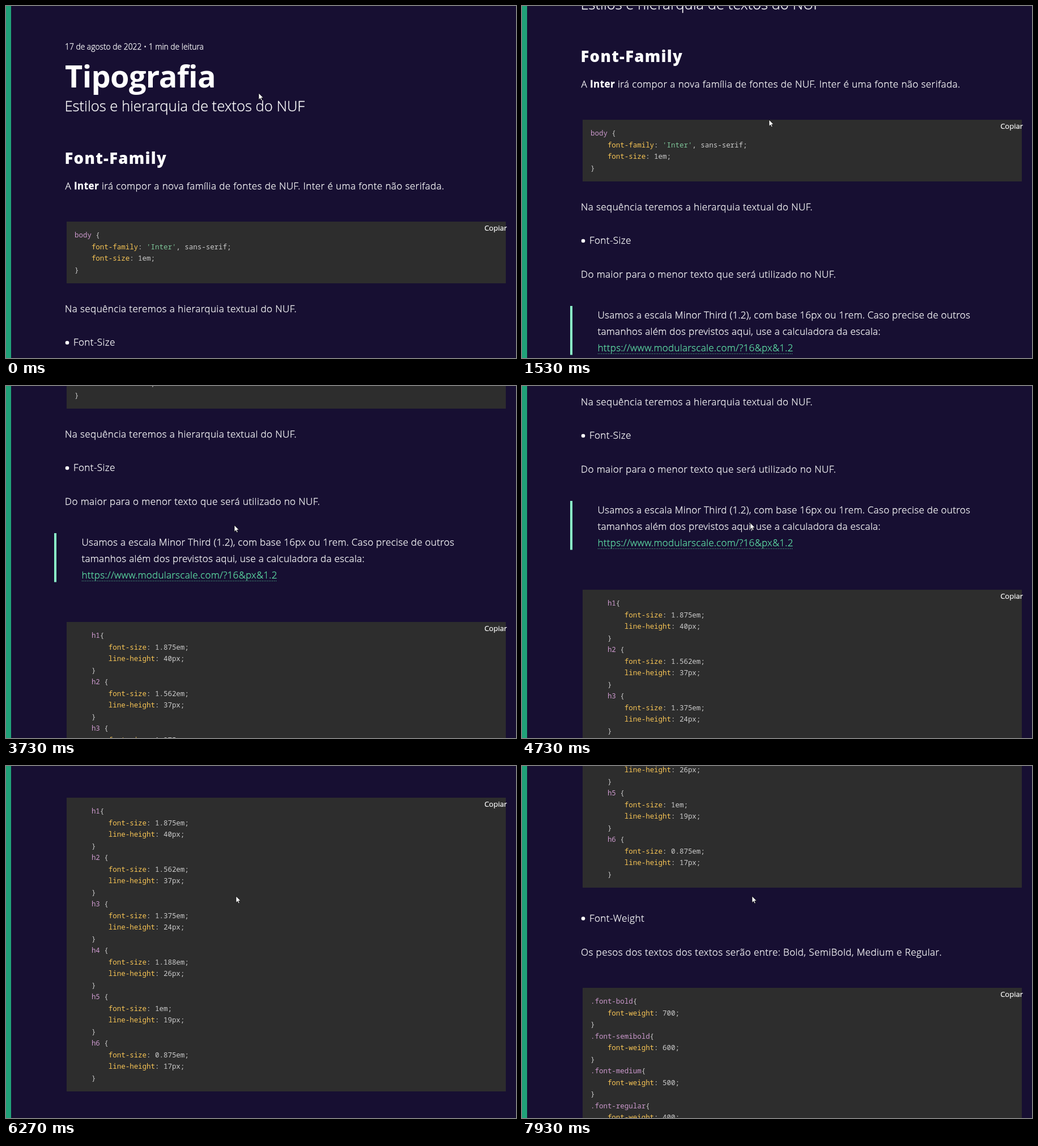
An HTML page for the animation above (8000 ms loop, 900 by 622 pixels).

```html
<!DOCTYPE html>
<html lang="pt">
<head>
<meta charset="utf-8">
<title>Tipografia</title>
<style>
  html, body { margin: 0; width: 100%; height: 100%; overflow: hidden; background: #170f32; }
  svg { display: block; width: 900px; height: 622px; }
  text { font-family: "Open Sans", "Noto Sans", sans-serif; fill: #fff; white-space: pre; }
  .date, .sub, .body, .quote { font-weight: 300; stroke: #fff; stroke-width: .3px; }
  .date { font-size: 13.85px; }
  .title { font-size: 54px; font-weight: 700; letter-spacing: -.6px; }
  .sub { font-size: 25.6px; }
  .head { font-size: 27.5px; font-weight: 800; letter-spacing: 1.3px; }
  .body { font-size: 17px; letter-spacing: .43px; }
  .quote { font-size: 17px; letter-spacing: .3px; }
  .body tspan { font-weight: 700; }
  .copy { font-size: 13px; text-anchor: end; stroke: #fff; stroke-width: .2px; }
  .code { font: 500 12.46px "Noto Sans Mono", "DejaVu Sans Mono", monospace; fill: #ccc; }
  .sel { fill: #cc99cd; }
  .prop { fill: #f8c555; }
  .str { fill: #7ec699; }
  #link text { fill: #5ee0a6; stroke: #5ee0a6; }
  #link path { stroke: #5ee0a6; stroke-dasharray: 1 2; }
</style>
</head>
<body>
<svg viewBox="0 0 900 622">
  <g id="page"></g>
  <rect width="9" height="622" fill="#21a179"/>
  <path id="cursor"/>
</svg>
<script>
const page = document.getElementById('page');
const cursor = document.getElementById('cursor');

const text = (x, y, cls, s) => `<text x="${x}" y="${y}" class="${cls}">${s}</text>`;
const bullet = (y, s) => `<circle cx="108" cy="${y - 5}" r="3.3" fill="#fff"/>` + text(119, y, 'body', s);

// Code block: leading spaces become an x offset, tokens get colours
const CHAR = 7.476, LINE = 20.5;
function paint(line) {
  if (line.endsWith('{')) return line.replace(/^[^ {]+/, '<tspan class="sel">$&</tspan>');
  return line.replace(/'\w+'/, '<tspan class="str">$&</tspan>')
             .replace(/^[\w-]+(?=:)/, '<tspan class="prop">$&</tspan>');
}
function block(top, lines) {
  const rows = lines.map((line, i) => {
    const code = line.trimStart();
    const x = 121 + (line.length - code.length) * CHAR;
    return text(x, top + 28.3 + i * LINE, 'code', paint(code));
  });
  return `<rect x="107" y="${top}" width="775" height="${lines.length * LINE + 27}" fill="#2d2d2d"/>`
    + text(884, top + 16, 'copy', 'Copiar') + rows.join('');
}

const headings = [['1.875', 40], ['1.562', 37], ['1.375', 24], ['1.188', 26], ['1', 19], ['0.875', 17]]
  .flatMap(([size, height], i) => [
    `    h${i + 1}${i ? ' ' : ''}{`,
    `        font-size: ${size}em;`,
    `        line-height: ${height}px;`,
    '    }'
  ]);
const weights = ['bold', 'semibold', 'medium', 'regular']
  .flatMap((name, i) => [`.font-${name}{`, `    font-weight: ${700 - i * 100};`, '}']);

page.innerHTML =
  text(104, 77, 'date', '17 de agosto de 2022 • 1 min de leitura') +
  text(104, 144, 'title', 'Tipografia') +
  text(103.5, 186, 'sub', 'Estilos e hierarquia de textos do NUF') +
  text(103.5, 279, 'head', 'Font-Family') +
  text(104.5, 324, 'body', 'A <tspan>Inter</tspan> irá compor a nova família de fontes de NUF. Inter é uma fonte não serifada.') +
  block(381, ['body {', "    font-family: 'Inter', sans-serif;", '    font-size: 1em;', '}']) +
  text(104, 541, 'body', 'Na sequência teremos a hierarquia textual do NUF.') +
  bullet(600, 'Font-Size') +
  text(104, 660, 'body', 'Do maior para o menor texto que será utilizado no NUF.') +
  '<rect x="85" y="710" width="4" height="86.5" fill="#8af8c8"/>' +
  text(133.5, 732, 'quote', 'Usamos a escala Minor Third (1.2), com base 16px ou 1rem. Caso precise de outros') +
  text(133.5, 761, 'quote', 'tamanhos além dos previstos aqui, use a calculadora da escala:') +
  '<g id="link">' + text(133.5, 790, 'quote', 'https://www.modularscale.com/?16&amp;px&amp;1.2') +
  '<path d="M134 794.5H477"/></g>' +
  block(867, headings) +
  bullet(1445.5, 'Font-Weight') +
  text(104, 1505.5, 'body', 'Os pesos dos textos dos textos serão entre: Bold, SemiBold, Medium e Regular.') +
  block(1563, weights);
const link = document.getElementById('link');

const shapes = {
  arrow: ['M0 0V11.5L2.6 9L4.4 13L6.2 12.2L4.5 8.3H8Z', '#fff', '#000', .7],
  beam: ['M-2 -7H2M0 -7V7M-2 7H2', 'none', '#fff', 1],
  hand: ['M-1.2 1Q0 -.6 1.2 1V5.5L5 6.6Q6.6 7.2 6.4 9.5L5.5 13V15H-1.5V13L-5 9Q-5 7.2 -3.3 7.8L-1.2 9.5Z', '#fff', '#000', .8]
};
// Pointer: time, x, y, shape
const moves = [
  [0, 446, 154, 'arrow'], [70, 440, 137, 'arrow'], [270, 439, 150, 'arrow'], [333, 438, 164, 'arrow'],
  [400, 438.5, 178.5, 'beam'], [800, 438.5, 182.5, 'beam'], [1133, 436, 190, 'arrow'], [1267, 436, 201, 'arrow'],
  [2400, 424, 224, 'arrow'], [2467, 410, 252, 'arrow'], [2533, 400, 271, 'arrow'], [2600, 396, 280, 'arrow'],
  [3330, 395, 280, 'arrow'], [3467, 399, 262, 'arrow'], [3533, 403, 246, 'arrow'], [4200, 403, 244, 'arrow'],
  [4270, 403, 242, 'arrow'], [4867, 404, 242.5, 'hand'], [5533, 403, 242, 'arrow'], [5667, 405, 236, 'arrow'],
  [5733, 406, 230, 'arrow']
];

// Each wheel notch scrolls the page by the same amount
const NOTCH = 90.08, GLIDE = 200;
const notches = [950, 1290, 2551, 3420, 3520, 4620, 4990, 5350, 5810, 6260, 6670, 7220, 7690];
const clamp = u => Math.min(1, Math.max(0, u));
const ease = u => u < .5 ? 2 * u * u : 1 - 2 * (1 - u) ** 2;

const LOOP = 8000, STEP = LOOP / 120;
function draw(ms) {
  const t = Math.floor((ms % LOOP + 4) / STEP) % 120 * STEP;
  const scroll = notches.reduce((sum, start) => sum + NOTCH * ease(clamp((t - start) / GLIDE)), 0);
  page.setAttribute('transform', `translate(0 ${-Math.round(scroll)})`);
  link.setAttribute('opacity', 1 - .3 * (clamp((t - 4850) / 400) - clamp((t - 5500) / 400)));

  const [, x, y, kind] = moves.findLast(m => m[0] <= t + 4);
  const [d, fill, stroke, width] = shapes[kind];
  const attrs = { d, fill, stroke, 'stroke-width': width, transform: `translate(${x} ${y})` };
  for (const name in attrs) cursor.setAttribute(name, attrs[name]);
}

const begin = performance.now();
function tick() {
  draw(performance.now() - begin);
  requestAnimationFrame(tick);
}
tick();
</script>
</body>
</html>
```
